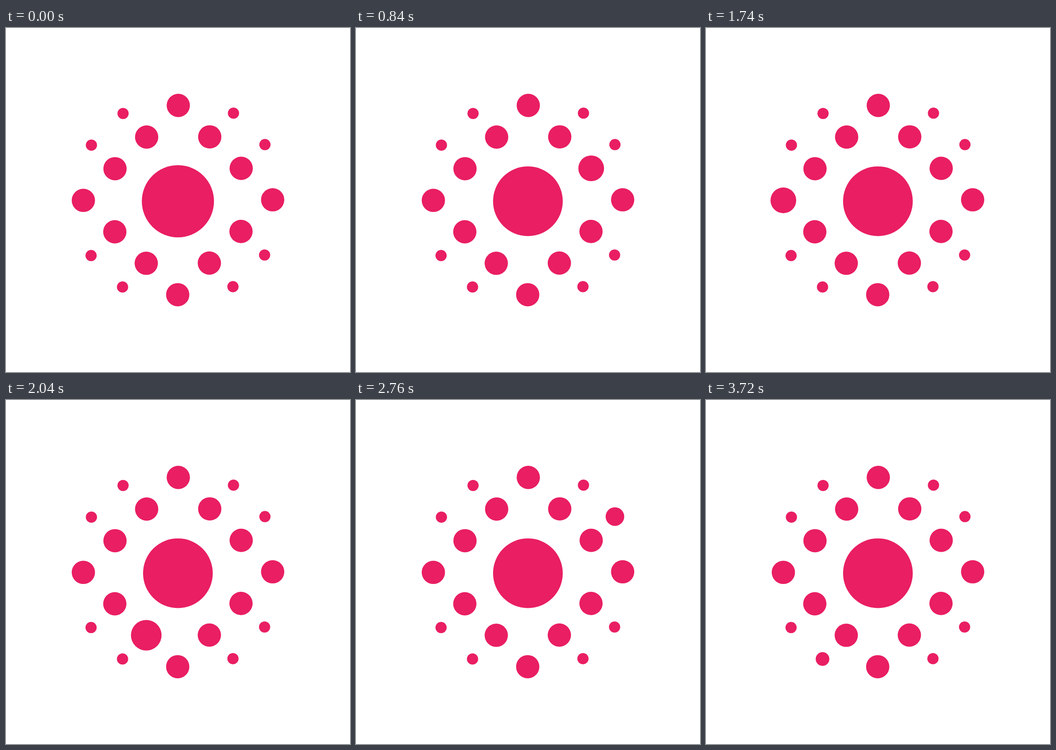
Write an HTML page that moves like this. It is 748x748 px and loops after 3750 ms.

```html
<!DOCTYPE html>
<html lang="en">
<head>
<meta charset="utf-8">
<title>Pulsing dots</title>
<style>
  html, body { margin: 0; width: 100%; height: 100%; overflow: hidden; background: #fff; }
  svg { display: block; width: 100%; height: 100%; fill: #e91e63; }
</style>
</head>
<body>
<svg id="stage" viewBox="0 0 748 748"></svg>
<script>
const LOOP = 3750, TICK = 30, TICKS_PER_DOT = 6, SWELL = 8;
const CX = 374, CY = 374.15, UNIT = 68.6, SKEW = -0.21;

const stage = document.getElementById('stage');
const dots = [];

function addDot(x, y, radius) {
  const circle = document.createElementNS('http://www.w3.org/2000/svg', 'circle');
  circle.setAttribute('cx', x);
  circle.setAttribute('cy', y);
  stage.append(circle);
  dots.push({ circle, radius });
}

// Triangle wave with the given amplitude and a period of four amplitudes.
function wave(size, s) {
  const period = 4 * size;
  return Math.abs((s + period) % period - 2 * size) - size;
}

// Places a dot on a diamond, s units counterclockwise from its lowest corner.
function addDiamondDot(size, s, radius) {
  const u = wave(size, s - size), v = wave(size, s);
  addDot(CX + UNIT * u + SKEW * v, CY + UNIT * v + SKEW * u, radius);
}

// Dots are added in the order in which they pulse.
addDot(373.8, 376.7, 75.8);
for (let s = 1; s <= 12; s++) addDiamondDot(3, s, 25.3);
for (let side = 0; side < 4; side++) {
  addDiamondDot(4.5, 4.5 * side + 1.75, 12.2);
  addDiamondDot(4.5, 4.5 * side + 2.75, 12.2);
}

function draw(time) {
  const tick = Math.floor((time % LOOP) / TICK);
  const active = Math.floor(tick / TICKS_PER_DOT);
  const phase = tick % TICKS_PER_DOT;
  const growth = SWELL * (1 - Math.abs(phase - 2) / 3);
  dots.forEach(({ circle, radius }, i) =>
    circle.setAttribute('r', radius + (i === active ? growth : 0)));
}

const start = performance.now();
function loop() {
  draw(performance.now() - start);
  requestAnimationFrame(loop);
}
loop();
</script>
</body>
</html>
```
